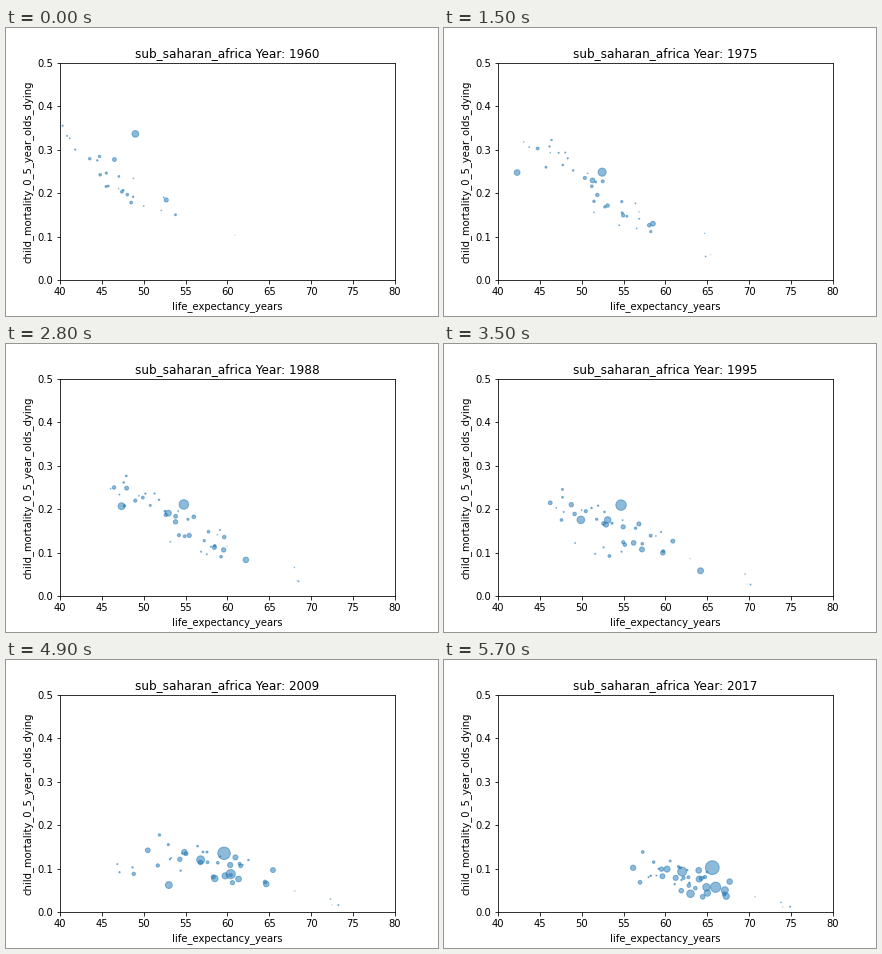
A matplotlib script for the animation above (5.8 s loop, 432x288 px).

```python
import matplotlib.pyplot as plt
import numpy as np
from matplotlib.animation import FuncAnimation

FIRST, LAST = 1960, 2017
SPAN = LAST - FIRST
N = 30  # countries in the general cloud

# Cloud shape over time: centre, spread and tilt of mortality against life expectancy
KEYS = (1960, 1969, 1981, 1995, 2003, 2017)
LIFE = (43.5, 48, 52, 53, 54.5, 61.8)
SPREAD = (3.8, 4, 4, 4.2, 4.5, 2.8)
MORT = (.275, .255, .215, .168, .140, .080)
TILT = (.0125, .0135, .0125, .007, .004, .004)

rng = np.random.default_rng(12)
rank = rng.permutation(np.linspace(-1.7, 1.7, N))
phase = rng.uniform(0, 2 * np.pi, N)
noise = np.clip(rng.normal(0, .02, N), -.035, .04)
pops = 1 + 41 * np.linspace(0, 1, N) ** 1.7
born = np.where(np.arange(N) % 3 == 0, 1970 + np.arange(N) // 3, FIRST)

# Largest countries: population at both ends, then (year, life, mortality)
BIG = [
    (45, 191, (1960, 49, .336), (1966, 50.4, .306), (1967, 38, .3), (1970, 38, .285),
     (1971, 50.8, .272), (1981, 54.9, .212), (1995, 54.7, .209), (2003, 55.5, .171),
     (2009, 59.6, .135), (2017, 65.6, .102)),
    (22, 106, (1960, 36, .27), (1981, 44.8, .238), (1995, 49.9, .175),
     (2003, 54.5, .125), (2009, 60.4, .087), (2017, 66, .057)),
    (15, 81, (1960, 46.5, .277), (1969, 49.8, .252), (1981, 52.8, .206),
     (1995, 53.1, .175), (2009, 56.8, .12), (2017, 62, .093)),
    (17, 57, (1960, 52.7, .184), (1969, 56.8, .151), (1995, 64.2, .058),
     (2003, 52.1, .074), (2009, 53, .062), (2017, 63, .042)),
    (8, 50, (1960, 48.5, .178), (1981, 61.9, .105), (1995, 57.2, .107),
     (2003, 54.2, .108), (2017, 67.1, .05)),
    (7, 55, (1960, 44.8, .242), (1981, 54.7, .177), (1995, 52.9, .164),
     (2009, 58.5, .077), (2017, 64.9, .057)),
]
# Southern countries: populations, first life expectancy, depth of the dip, first mortality
SOUTH = [(3.7, 14, 53.8, 22, .15), (.5, 2.2, 52.1, 22, .16), (.6, 2.5, 50, 11.5, .17),
         (.8, 2.2, 52.4, 20.6, .19), (.35, 1.4, 47, 16.6, .21)]
# Islands: first year, populations, life expectancy and mortality at both ends
ISLANDS = [(1960, .04, .095, 60.9, 74, .103, .012), (1972, .8, 1.26, 63.5, 74.9, .06, .012),
           (1972, .25, .54, 63.5, 73.8, .12, .022), (1983, .1, .2, 57, 70.7, .14, .035)]


def grow(a, b, k):
    return a * (b / a) ** k


def cloud(year, k):
    life, spread, mort, tilt = (np.interp(year, KEYS, v) for v in (LIFE, SPREAD, MORT, TILT))
    dx = spread * (rank + .4 * np.sin(phase + 3 * k))
    y = np.maximum(mort - tilt * dx + noise, .035)
    dots = np.column_stack([life + dx, y, grow(pops / 5.5, pops, k)])
    return dots[born <= year]


def big(year, k):
    for p0, p1, *path in BIG:
        years, life, mort = zip(*path)
        yield np.interp(year, years, life), np.interp(year, years, mort), grow(p0, p1, k)


def south(year, k):
    dip = np.exp(-((year - 2005) / 12) ** 2)
    for p0, p1, life, depth, mort in SOUTH:
        t = year - FIRST
        yield life + .3 * t - depth * dip, mort * np.exp(-.02 * t) + .035 * dip, grow(p0, p1, k)


def islands(year):
    for start, p0, p1, x0, x1, m0, m1 in ISLANDS:
        if year >= start:
            k = (year - start) / (LAST - start)
            yield x0 + (x1 - x0) * k ** .8, grow(m0, m1, k), grow(p0, p1, k)


def state(year):
    k = (year - FIRST) / SPAN
    return np.array([*cloud(year, k), *big(year, k), *south(year, k), *islands(year)])


fig, ax = plt.subplots(figsize=(6, 4), dpi=72)
fig.subplots_adjust(left=.125, right=.9, bottom=.125, top=.88)
ax.set(xlim=(40, 80), ylim=(0, .5), xlabel="life_expectancy_years",
       ylabel="child_mortality_0_5_year_olds_dying")
title = ax.set_title("")
dots = ax.scatter([], [], color="C0", alpha=.5)


def update(i):
    year = FIRST + i
    data = state(year)
    dots.set_offsets(data[:, :2])
    dots.set_sizes(data[:, 2])
    title.set_text(f"sub_saharan_africa Year: {year}")
    return dots, title


anim = FuncAnimation(fig, update, frames=SPAN + 1, interval=100,
                     repeat=True, repeat_delay=0, blit=False)
plt.show()
```
